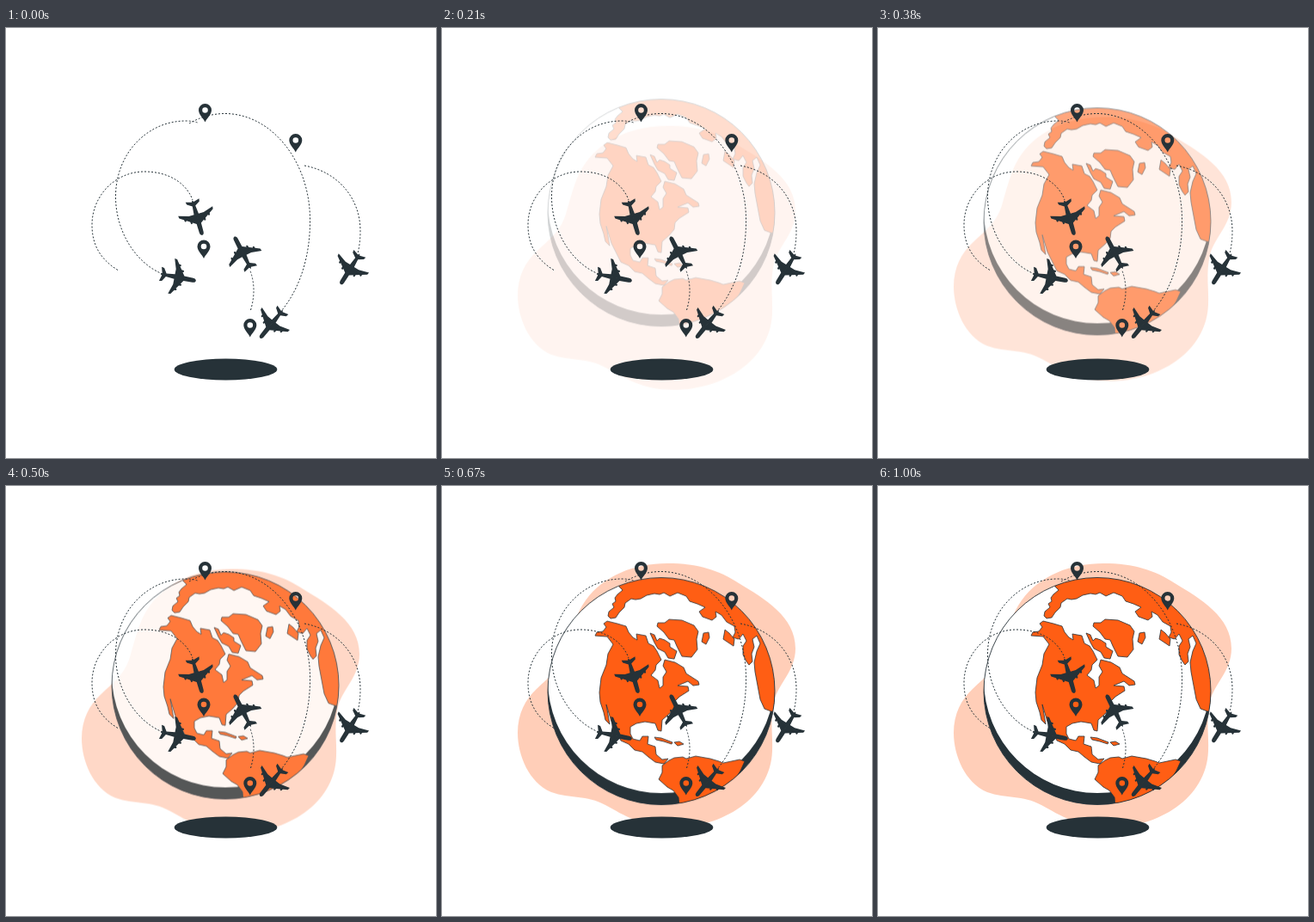
An HTML page that plays this animation: 500 by 500 pixels, repeating every 1040 ms.

```html
<!DOCTYPE html>
<html lang="en">
<head>
<meta charset="utf-8">
<title>Flights around the globe</title>
<style>
  html, body { margin: 0; width: 100%; height: 100%; overflow: hidden; background: #fff; }
  svg { display: block; width: 100vw; height: 100vh; }

  .dark { fill: #263238; }
  .land { fill: #ff5e14; stroke: #263238; stroke-width: .8; stroke-linejoin: round; }
  .rim { fill: none; stroke: #263238; stroke-width: .9; }
  .routes { fill: none; stroke: #263238; stroke-width: 1; stroke-dasharray: 2 2; }
  .engines { fill: none; stroke: #263238; stroke-width: 2.2; stroke-linecap: round; }

  /* The easing overshoots, so both parts drift past their rest and settle back. */
  .globe, .blob {
    animation: enter 1040ms cubic-bezier(.345, .087, .4985, 1.3675) infinite;
  }
  .globe { --from: -30px; }
  .blob { --from: 30px; }
  @keyframes enter {
    0% { opacity: 0; transform: translateY(var(--from)); }
    96.154%, 100% { opacity: 1; transform: translateY(0); }
  }
</style>
</head>
<body>
<svg viewBox="0 0 500 500">
  <defs>
    <clipPath id="disc"><circle cx="255" cy="238.500" r="132"/></clipPath>

    <path id="pin" class="dark" fill-rule="evenodd"
      d="M0 21.5C-2 17-7.5 12.5-7.5 7.5a7.5 7.5 0 0 1 15 0C7.5 12.5 2 17 0 21.5Z
         M0 4.2a3.3 3.3 0 1 0 0 6.6a3.3 3.3 0 0 0 0-6.6Z"/>

    <g id="half">
      <path class="dark" d="M0-20.5C1.8-20.5 2.4-19 2.5-17L2.7-6.5L20.4 5.4L20.8 8.4L9 4.6L2.8 4.6L1.8 14.5L7.6 18.2L8.2 21.4L1.2 19.4L0 21H-.3V-20.5Z"/>
      <path class="engines" d="M8-4V0M14.2 .5V4"/>
    </g>
    <g id="plane">
      <use href="#half"/>
      <use href="#half" transform="scale(-1 1)"/>
    </g>
  </defs>

  <path class="blob" fill="#ff5e14" fill-opacity=".3"
    d="M262 90C298 90 322 98 345 113C375 131 411 152 411 189C411 215 391 230 386 250
       C381 272 385 291 384 308C382 364 325 397 270 397C233 397 212 383 190 371
       C168 359 149 364 127 356C101 345 88 313 88 287C88 265 97 248 110 236
       C126 221 139 212 145 189C152 165 156 148 167 133C188 104 224 90 262 90Z"/>

  <ellipse class="dark" cx="255.5" cy="397" rx="59.8" ry="12.4"/>

  <g class="globe">
    <circle cx="255" cy="238.500" r="132" fill="#fff"/>
    <g clip-path="url(#disc)">
      <path class="dark" d="M123 225A132 132 0 0 0 387 225V380H123Z"/>

      <!-- Eurasia and Africa -->
      <path class="land"
        d="M200 100L206 117L210 121L204 126L201 130L202 134L198 137L200 141L194 146L193 151L196 154
           L202 153L206 147L212 141L213 136L220 131L225 132L231 131L238 127L247 125L253 126L258 124
           L265 128L274 124L284 128L288 134L297 137L306 141L299 146L303 152L314 156L319 152
           L318 146L325 150L331 158L340 163L341 170L338 176L345 178L350 172L354 180L350 186L350 196
           L354 204L357 208L361 204L360 195L363 187L361 178L366 174L370 183L366 192L363 205L364 216
           L367 232L370 248L375 259L383 262L400 261V100Z"/>
      <path class="land" d="M329 167L334 171L340 178L339 186L333 182L327 178Z"/>
      <path class="land" d="M304 171L310 170L311 176L307 184L302 181Z"/>

      <!-- North and Central America -->
      <path class="land"
        d="M178 174L180 170L187 169L191 164L188 160L192 157L204 160L214 163L217 170L222 176L227 179
           L226 172L237 174L240 183L246 186L250 192L255 202L249 208L248 214L243 220L251 226L253 235
           L257 232L257 222L261 216L257 209L259 202L271 205L281 211L284 218L298 227L299 231L292 232
           L286 227L274 232L286 233L287 238L276 245L271 250L270 258L264 265L256 272L255 285L251 284
           L248 276L236 274L226 276L219 280L219 288L222 294L230 296L233 291L240 291L239 300L248 303
           L249 312L256 318L263 317L258 323L248 321L240 315L233 309L224 307L217 300L208 296L204 288
           L197 274L191 254L195 277L190 272L188 263L184 251L183 240L185 223L191 208L193 195L199 184
           L192 175Z"/>

      <!-- Greenland and the northern islands -->
      <path class="land"
        d="M250 163L251 159L259 159L264 155L279 156L293 162L298 169L296 178L297 190L290 199
           L279 198L273 186L270 179L264 178L258 170Z"/>
      <path class="land"
        d="M242 171L247 173L250 180L253 177L259 179L265 183L265 187L273 192L270 201L263 200
           L259 193L251 189L247 182Z"/>

      <!-- Caribbean -->
      <path class="land" d="M247 292L255 293L268 298L267 300L258 297L249 295Z"/>
      <path class="land" d="M270 298L276 297L281 300L274 302Z"/>

      <!-- South America -->
      <path class="land"
        d="M252 341L256 333L256 325L264 319L270 316L280 315L284 317L295 314L312 317L322 320L327 322
           L346 318L352 320L347 331L342 339V385H277L275 362L269 354L262 350Z"/>
    </g>
    <circle class="rim" cx="255" cy="238.500" r="132"/>
  </g>

  <g class="routes">
    <path d="M130 281.500C108 268 100 250 100 229C100 195 127 167 161 167C190 167 210 181 217 200"/>
    <path d="M182 286C150 273 127 235 127.500 195C128 145 165 108 209 108Q218 108 224 110.500"/>
    <path d="M213 111Q233 99.500 255 99.500C309 100 353 155 353.500 222C354 265 342 302 321 328"/>
    <path d="M347 160C385 167 412 197 412 236Q412 250 409 262"/>
    <path d="M284.500 328Q292 303 283.500 281"/>
  </g>

  <use href="#pin" x="231.5" y="88"/>
  <use href="#pin" x="336.800" y="123"/>
  <use href="#pin" x="230" y="246.500"/>
  <use href="#pin" x="283.800" y="338"/>

  <use href="#plane" transform="translate(222.5 221) rotate(164)"/>
  <use href="#plane" transform="translate(200.5 290) rotate(101)"/>
  <use href="#plane" transform="translate(275 261) rotate(-27)"/>
  <use href="#plane" transform="translate(400 280.5) rotate(212)"/>
  <use href="#plane" transform="translate(308.5 344.5) rotate(219)"/>
</svg>
</body>
</html>
```
